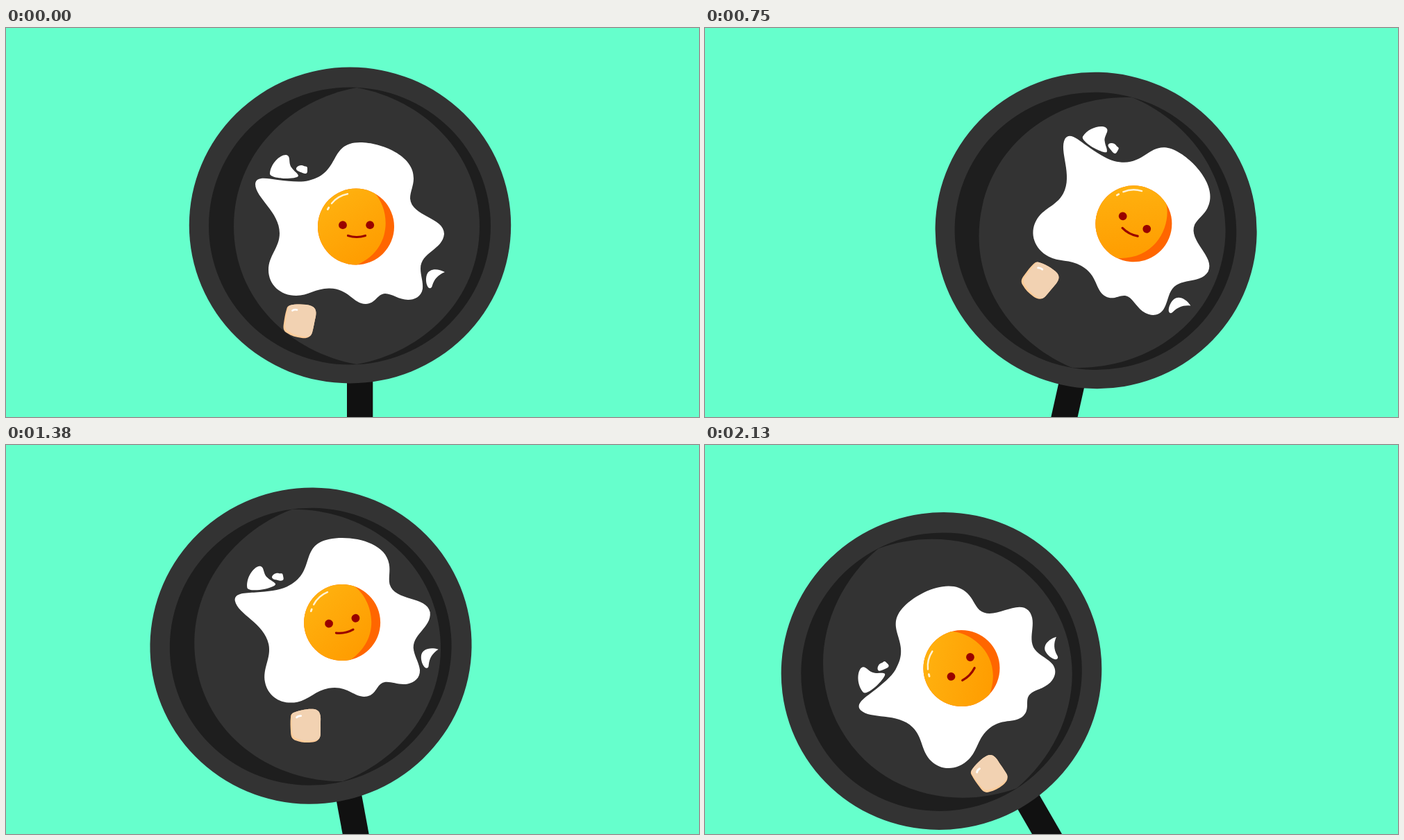
Write an HTML page with a canvas that moves like this. It is 998 by 561 pixels and loops after 2.16 s.

```html
<!DOCTYPE html>
<html lang="en">
<head>
<meta charset="utf-8">
<title>Frying egg</title>
<style>
html, body { margin: 0; width: 100%; height: 100%; overflow: hidden; background: #66ffcc; }
canvas { display: block; }
</style>
</head>
<body>
<canvas id="stage" width="998" height="561"></canvas>
<script>
const ctx = document.getElementById('stage').getContext('2d');
const LOOP = 2160, STEP = 30;
const PAN_PIVOT = [495.5, 594.5];
const EGG_PIVOT = [504, 486.5];

// time, angle
const panKeys = [[0, 0], [570, 18], [1170, 0], [1770, -30], [LOOP, -30]];
const eggTurn = [[0, 0], [720, 30], [1380, -11.5], [1512, -19.8], [1650, -25.7], [2130, -45.5], [LOOP, -46.7]];
// time, pivot x, pivot y
const eggPath = [
  [0, 504, 486.5], [300, 512.1, 476.3], [720, 523, 459], [1020, 524.3, 456.3],
  [1380, 524, 452], [1650, 510.7, 458.2], [2130, 512.1, 462.2], [LOOP, 512.2, 462.4]
];

const rim = blob(495.5, 284.5, 231.7, 228);
const well = blob(495, 285.5, 203, 200);
const base = new Path2D('M505 86C600 103 682 180 682 286C682 392 600 468 505 485C410 468 328 392 328 286C328 180 410 103 505 86Z');
const white = new Path2D(`M510 165C540 165 588 184 587 217C587 228 582 236 582 246C584 272 631 273 631 297
  C629 320 597 323 597 347C597 357 601 366 600 376C598 388 588 392 579 392C566 392 556 383 546 383
  C535 383 532 398 518 398C500 398 494 376 466 375.5C447 375 435 386 418 386C395 386 378 370 378 349
  C378 328 394 317 394 296C394 265 359 245 359 225C360 213 376 217 391 219C408 221 424 223 436 220
  C483 209 464 165 510 165Z`);
const drops = new Path2D(`M380 210C381 196 394 183 403 183C411 184 406 194 411 201C415 207 420 209 421 213
  C421 216 410 217 403 217C395 217 380 215 380 210Z
  M418 202C420 198 426 197 429 199C431 200 434 199 434 202L434 206C434 210 432 211 427 209C423 207 417 206 418 202Z
  M632 352C622 356 617 362 614 371C613 376 610 376 608 374C605 370 604 362 606 356C609 347 621 346 632 352Z`);
const butter = new Path2D(`M409 400C417 398 432 398 440 401C447 404 447 410 446 416C444 424 443 432 441 439
  C439 446 433 448 426 447C418 446 411 444 405 440C399 437 399 432 400 426C401 419 402 412 404 406C405 402 406 401 409 400Z`);
const yolk = blob(504, 286.5, 55, 55);
const yolkLit = new Path2D('M531 238C553 262 558 318 505 342L440 350L440 220L520 220Z');

const yolkFill = ctx.createLinearGradient(465, 245, 525, 335);
yolkFill.addColorStop(0, '#ffb10f');
yolkFill.addColorStop(1, '#ff9c00');

function blob(x, y, rx, ry) {
  const p = new Path2D();
  p.ellipse(x, y, rx, ry, 0, 0, Math.PI * 2);
  return p;
}

function at(keys, t) {
  let i = 1;
  while (i < keys.length - 1 && t > keys[i][0]) i++;
  const a = keys[i - 1], b = keys[i];
  const k = (t - a[0]) / (b[0] - a[0]);
  return a.slice(1).map((v, j) => v + (b[j + 1] - v) * k);
}

function fill(path, color) {
  ctx.fillStyle = color;
  ctx.fill(path);
}

function line(d, color, width) {
  ctx.strokeStyle = color;
  ctx.lineWidth = width;
  ctx.lineCap = 'round';
  ctx.stroke(new Path2D(d));
}

// Draws with the pivot moved to (x, y) and turned by deg
function posed(pivot, x, y, deg, draw) {
  ctx.save();
  ctx.translate(x, y);
  ctx.rotate(deg * Math.PI / 180);
  ctx.translate(-pivot[0], -pivot[1]);
  draw();
  ctx.restore();
}

function clipped(path, draw) {
  ctx.save();
  ctx.clip(path);
  draw();
  ctx.restore();
}

function drawPan() {
  ctx.fillStyle = '#111';
  ctx.fillRect(491, 470, 37.3, 260);
  fill(rim, '#333');
  fill(well, '#1e1e1e');
  clipped(well, () => fill(base, '#333'));
}

function drawEgg() {
  fill(white, '#fff');
  fill(drops, '#fff');

  fill(butter, '#ffcc99');
  clipped(butter, () => {
    ctx.translate(2.5, -2);
    fill(butter, '#f2d2b2');
  });
  line('M412.5 407.5Q415 405.5 419 406.5', '#fff', 2.8);

  fill(yolk, '#ff6600');
  clipped(yolk, () => fill(yolkLit, yolkFill));
  line('M469 253Q478 242 492 239.3', '#fff3d6', 2.4);
  line('M463.3 261.5L464.8 259', '#fff3d6', 2.8);

  fill(blob(485, 284.2, 5.9, 5.9), '#990000');
  fill(blob(524.2, 284.2, 5.9, 5.9), '#990000');
  line('M492.5 299.5Q505 303.5 517.5 299.5', '#990000', 3.2);
}

function frame(now) {
  const t = Math.floor(now % LOOP / STEP) * STEP;
  ctx.fillStyle = '#66ffcc';
  ctx.fillRect(0, 0, 998, 561);
  posed(PAN_PIVOT, ...PAN_PIVOT, at(panKeys, t)[0], drawPan);
  const [x, y] = at(eggPath, t);
  posed(EGG_PIVOT, x, y, at(eggTurn, t)[0], drawEgg);
}

const start = performance.now();
function tick() {
  frame(performance.now() - start);
  requestAnimationFrame(tick);
}
tick();
</script>
</body>
</html>
```
